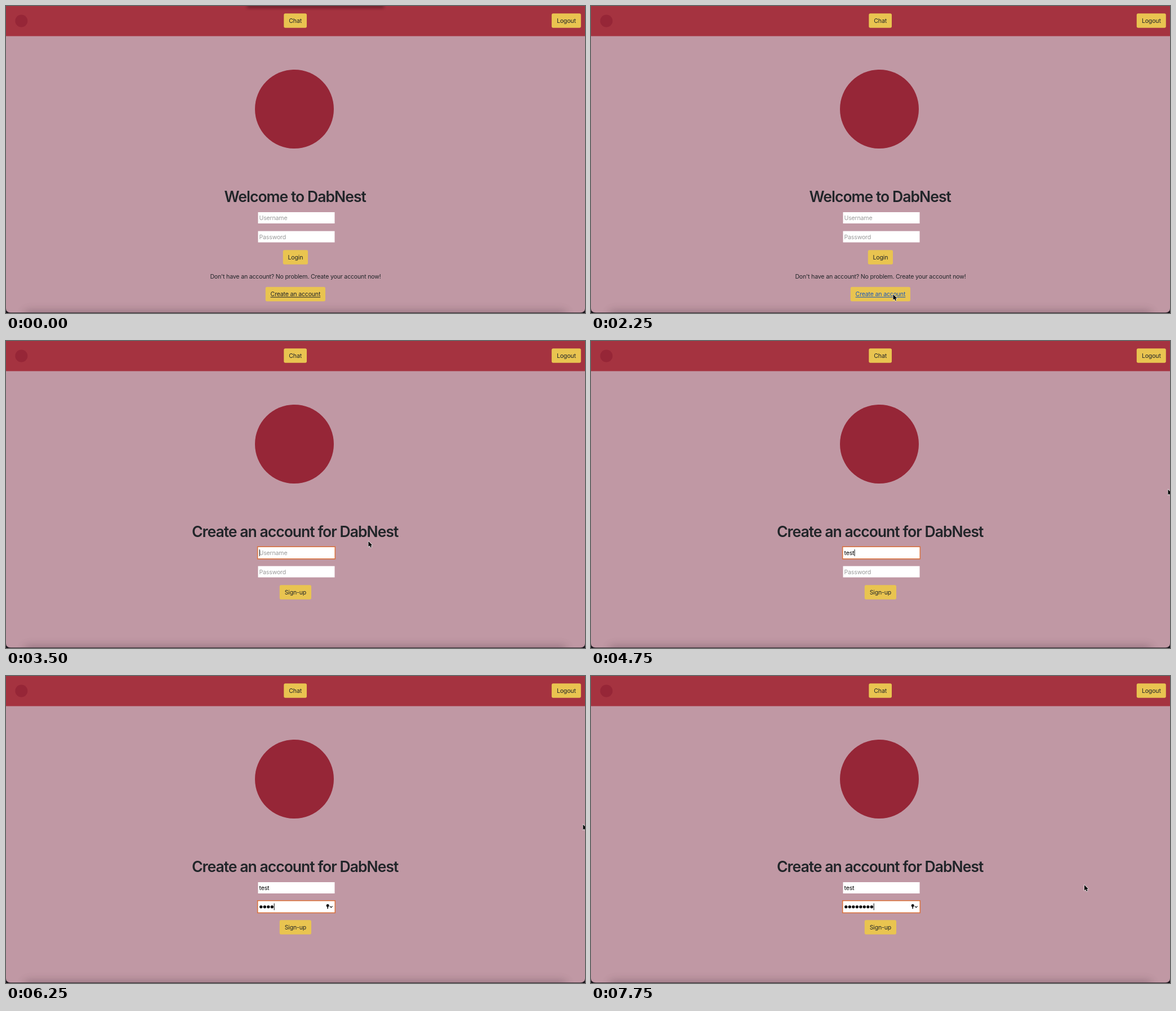
These frames come from a looping animation (1028x545 px, 8 s). An HTML page:

```html
<!DOCTYPE html>
<html lang="en">
<head>
<meta charset="utf-8">
<title>Sign up</title>
<style>
  html, body { margin: 0; width: 100%; height: 100%; overflow: hidden; background: #17131a; }
  svg { display: block; width: 1028px; height: 545px; }
  text {
    font: 400 10.6px Inter, "Open Sans", sans-serif;
    font-optical-sizing: none;
    letter-spacing: -0.018em;
    fill: #212529;
  }
  .mid { text-anchor: middle; }
  .title { font-size: 26.6px; font-weight: 560; letter-spacing: -0.038em; }
  .btn { fill: #e9c450; }
  .link { text-decoration: underline; }
  .link.hover { fill: #1a58bd; }
  .typed { fill: #000; }
  .typed.empty { fill: #999; }
  .field { fill: #fff; }
  .ring { fill: #fff; stroke: #d9723f; stroke-width: 3.2; paint-order: stroke; }
  .logo { fill: #962637; }
</style>
</head>
<body>
<svg viewBox="0 0 1028 545">
  <defs>
    <clipPath id="window"><path d="M0 0H1028V537Q1028 544.3 1020 544.3H8Q0 544.3 0 537Z"/></clipPath>
    <filter id="soft" x="-10%" y="-300%" width="120%" height="700%"><feGaussianBlur stdDeviation="8"/></filter>
    <filter id="tight" x="-10%" y="-200%" width="120%" height="500%"><feGaussianBlur stdDeviation="2.5"/></filter>
  </defs>
  <g clip-path="url(#window)">
    <rect width="1028" height="545" fill="#c098a4"/>
    <rect width="1028" height="53.5" fill="#a53340"/>
    <rect id="topShade" x="428" y="-8" width="243" height="12" fill="#400a18" opacity=".45" filter="url(#tight)"/>
    <rect x="34" y="542" width="960" height="20" fill="#3a2630" opacity=".33" filter="url(#soft)"/>

    <circle class="logo" cx="27.3" cy="26.5" r="11"/>
    <circle class="logo" cx="512" cy="183" r="70"/>

    <g id="nav"></g>
    <text id="title" class="mid title" x="513.2" y="347.8"></text>
    <g id="fields"></g>
    <g id="login">
      <text class="mid" x="514" y="484">Don't have an account? No problem. Create your account now!</text>
    </g>
    <g id="signup"></g>

    <g id="keyIcon" fill="none" stroke="#111" stroke-width="1.2">
      <path d="M571.2 408V413.2" stroke-width="1.6"/>
      <circle cx="571.2" cy="407.6" r="1.9" fill="#111"/>
      <path d="M575 408.6L577.3 411L579.6 408.6"/>
    </g>
    <g id="dots"></g>
    <rect id="caret" width="1" height="12" fill="#111"/>
    <path id="cursor" d="M0 0V9.8L2.3 7.8L3.9 11.3L5.5 10.6L4 7.2H7Z"
      fill="#000" stroke="#fff" stroke-width="1.2" paint-order="stroke" stroke-linejoin="round"/>
  </g>
</svg>
<script>
const LOOP = 8000;
const BRAND = "DabNest";
const $ = id => document.getElementById(id);

function add(parent, tag, attrs, text = "") {
  const node = document.createElementNS("http://www.w3.org/2000/svg", tag);
  for (const key in attrs) node.setAttribute(key, attrs[key]);
  node.textContent = text;
  return parent.appendChild(node);
}

function button(parent, label, x, y, w, extra = "") {
  add(parent, "rect", { class: "btn", x, y, width: w, height: 25.5, rx: 2.7 });
  return add(parent, "text", { class: "mid " + extra, x: x + w / 2, y: y + 16.6 }, label);
}

function field(y, hint) {
  const box = add($("fields"), "rect", { x: 447.5, y, width: 136, height: 20 });
  const label = add($("fields"), "text", { x: 449.5, y: y + 14 });
  return {
    y, label,
    show(value, focused) {
      box.setAttribute("class", focused ? "ring" : "field");
      label.setAttribute("class", value ? "typed" : "typed empty");
      label.textContent = value || hint;
    }
  };
}

button($("nav"), "Chat", 493.3, 13.3, 40.7);
button($("nav"), "Logout", 968.8, 13.3, 52);
button($("login"), "Login", 491.8, 433.2, 44.2);
button($("signup"), "Sign-up", 485.8, 433.2, 56.2);
const link = button($("login"), "Create an account", 460.8, 498.8, 106.2, "link");
const user = field(366, "Username");
const pass = field(399.6, "Password");
const dots = Array.from({ length: 8 }, (_, i) =>
  add($("dots"), "circle", { cx: 452.8 + 6.5 * i, cy: 409.8, r: 2.65 }));

// Each step changes only the listed properties and holds until the next.
const steps = [
  { at: 0, shade: true, pos: null, page: "login", hover: false, focus: "", name: "", count: 0, caret: false },
  { at: 250, shade: false, pos: [993, 75] },
  { at: 500, pos: [932, 155] },
  { at: 750, pos: [840, 234] },
  { at: 1000, pos: [758, 299] },
  { at: 1250, pos: [719, 342] },
  { at: 1500, pos: [640, 425] },
  { at: 1750, pos: [566, 489] },
  { at: 2000, pos: [540, 510], hover: true },
  { at: 2250, pos: [536.5, 512] },
  { at: 2500, page: "signup", hover: false },
  { at: 2750, pos: [532, 455] },
  { at: 3000, pos: [526, 384] },
  { at: 3250, pos: [536, 374], focus: "user", caret: true },
  { at: 3500, pos: [643.5, 355.5] },
  { at: 3750, pos: [1024.5, 263.5] },
  { at: 4000, caret: false },
  { at: 4500, name: "te", caret: true },
  { at: 4750, name: "test" },
  { at: 5000, focus: "pass" },
  { at: 5500, count: 1 },
  { at: 5750, count: 2 },
  { at: 6000, count: 3 },
  { at: 6250, count: 4 },
  { at: 6500, count: 7 },
  { at: 6750, count: 5 },
  { at: 7000, count: 7 },
  { at: 7500, count: 8, pos: [952, 322] },
  { at: 7750, pos: [876, 371] }
];

const show = (node, on) => { node.style.display = on ? "" : "none"; };

function draw(s) {
  const signup = s.page === "signup";
  show($("topShade"), s.shade);
  show($("login"), !signup);
  show($("signup"), signup);
  $("title").textContent = (signup ? "Create an account for " : "Welcome to ") + BRAND;
  link.classList.toggle("hover", s.hover);

  const onPass = s.focus === "pass";
  user.show(s.name, s.focus === "user");
  pass.show("", onPass);
  show(pass.label, !s.count);
  show($("keyIcon"), onPass);
  dots.forEach((dot, i) => show(dot, i < s.count));

  const width = onPass ? 6.5 * s.count : s.name ? user.label.getComputedTextLength() : 0;
  $("caret").setAttribute("x", 449.7 + width);
  $("caret").setAttribute("y", (onPass ? pass.y : user.y) + 4);
  show($("caret"), s.caret);

  show($("cursor"), s.pos);
  if (s.pos) $("cursor").setAttribute("transform", `translate(${s.pos})`);
}

const start = performance.now();
let shown = -1;

function tick(now) {
  const t = Math.max(0, now - start) % LOOP;
  const past = steps.filter(step => step.at <= t);
  if (past.length !== shown) {
    shown = past.length;
    draw(Object.assign({}, ...past));
  }
  requestAnimationFrame(tick);
}
tick(start);
</script>
</body>
</html>
```
